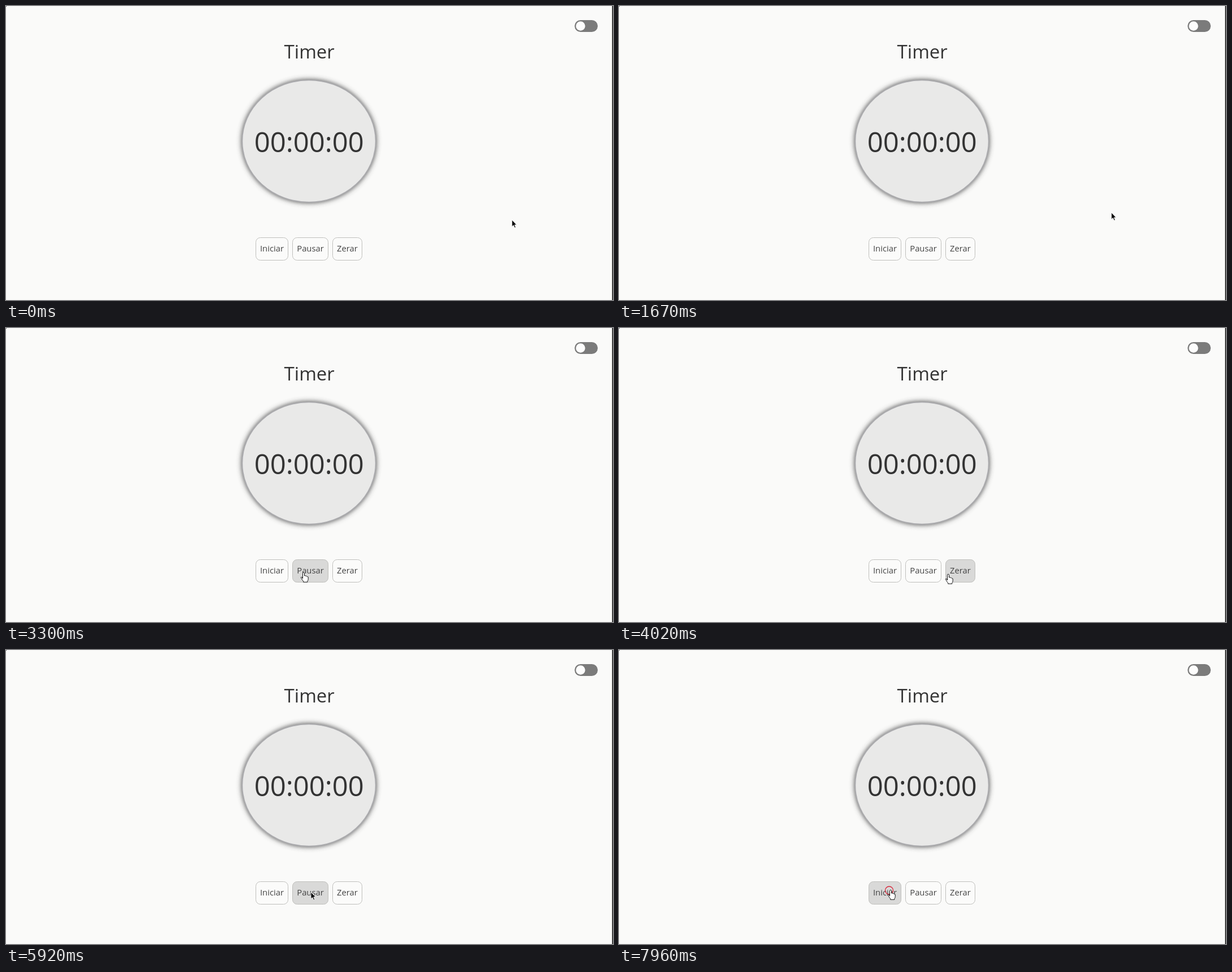
Write an HTML page that moves like this. It is 1075x521 px and loops after 8 s.

```html
<!DOCTYPE html>
<html lang="pt">
<head>
<meta charset="utf-8">
<title>Timer</title>
<style>
  html, body { margin: 0; width: 100%; height: 100%; overflow: hidden; background: #fafaf9; }
  svg { display: block; width: 1075px; height: 521px; }
  text { font-family: "Open Sans", sans-serif; text-anchor: middle; fill: #333; }
  .button rect { fill: #fbfbfa; stroke: #bfbfbc; }
  .button text { font-size: 14.8px; fill: #444; }
  .button.hover rect { fill: #d9d9d8; }
</style>
</head>
<body>
<svg viewBox="0 0 1075 521">
  <defs>
    <filter id="blur" x="-20%" y="-20%" width="140%" height="140%">
      <feGaussianBlur stdDeviation="4.8"/>
    </filter>
  </defs>
  <rect width="1075" height="521" fill="#fafaf9"/>
  <rect width="1" height="1" fill="#333"/>
  <rect x="1073.5" width="1.5" height="521" fill="#111"/>

  <rect x="1007" y="25" width="41" height="21" rx="10.5" fill="#7b7b7b"/>
  <circle cx="1017.5" cy="35.5" r="8.2" fill="#fdfdfd"/>

  <text x="537.2" y="93" font-size="33">Timer</text>

  <ellipse cx="536.5" cy="239.5" rx="119" ry="109" fill="#444" filter="url(#blur)"/>
  <ellipse cx="536.5" cy="239.5" rx="118.2" ry="108.2" fill="#e9e9e8" stroke="#acacaf" stroke-width="1.8"/>
  <text x="536.8" y="258.7" font-size="49">00:00:00</text>

  <g id="buttons"></g>

  <circle id="click" cx="478.5" cy="426" r="7" fill="none" stroke="#d8283c" stroke-width="1.3"/>
  <g id="cursor">
    <path id="arrow" d="M0 0V12.2L2.8 9.6L4.9 14.2L6.8 13.3L4.8 8.9H8.4Z"
      fill="#000" stroke="#fff" stroke-width=".9"/>
    <path id="hand" d="M-1.5 11V1.6Q-1.5 .3 0 .3T1.5 1.6V6Q3.4 5 4.2 6.7Q5.8 6 6.4 7.5Q8.2 7.2 8.2 9V12.5Q8 14.5 6.8 15.7V17.3H-.3V15.7Q-2 14-3.2 11.8L-4.6 9.6Q-4.8 8-3.2 8.4Z"
      fill="#fff" stroke="#111" stroke-linejoin="round"/>
  </g>
</svg>
<script>
  const LOOP = 8000, CURSOR_LAG = 50, CLICK_AT = 7920;
  const TOP = 410.5, HEIGHT = 40, GAP = 8;
  const $ = id => document.getElementById(id);

  let left = 442.5;
  const buttons = [["Iniciar", 57], ["Pausar", 63], ["Zerar", 52]].map(([label, width]) => {
    const x = left;
    left += width + GAP;
    return { label, x, width };
  });

  $("buttons").innerHTML = buttons.map(({ label, x, width }) => `
    <g class="button">
      <rect x="${x}" y="${TOP}" width="${width}" height="${HEIGHT}" rx="8"/>
      <text x="${x + width / 2}" y="435">${label}</text>
    </g>`).join("");
  const nodes = [...document.querySelectorAll(".button")];

  // Places where the pointer turns or rests: time, x, y
  const stops = [
    [0, 896, 379], [1670, 872, 366], [2350, 480, 431], [4540, 599, 437], [4850, 604, 446],
    [5780, 604, 430], [6060, 478, 428], [6800, 495, 427], [7300, 481, 425], [LOOP, 481, 425]
  ];

  const ease = k => (1 - Math.cos(Math.PI * k)) / 2;

  function pointAt(time) {
    const t = Math.max(0, time);
    const i = stops.findIndex(stop => stop[0] > t);
    const [t0, x0, y0] = stops[i - 1], [t1, x1, y1] = stops[i];
    const k = ease((t - t0) / (t1 - t0));
    return [x0 + (x1 - x0) * k, y0 + (y1 - y0) * k];
  }

  function buttonUnder([px, py]) {
    return buttons.findIndex(({ x, width }) =>
      px >= x && px <= x + width && py >= TOP && py <= TOP + HEIGHT);
  }

  const show = (node, on) => node.setAttribute("visibility", on ? "visible" : "hidden");

  function draw(t) {
    const point = pointAt(t);
    const hovered = buttonUnder(point);
    nodes.forEach((node, i) => node.classList.toggle("hover", i === hovered));

    // The pointer shape follows the hover with a short delay
    const isHand = buttonUnder(pointAt(t - CURSOR_LAG)) >= 0;
    show($("hand"), isHand);
    show($("arrow"), !isHand);
    $("cursor").setAttribute("transform", `translate(${point.map(Math.round)})`);
    show($("click"), t >= CLICK_AT);
  }

  function tick() {
    draw(performance.now() % LOOP);
    requestAnimationFrame(tick);
  }
  tick();
</script>
</body>
</html>
```
